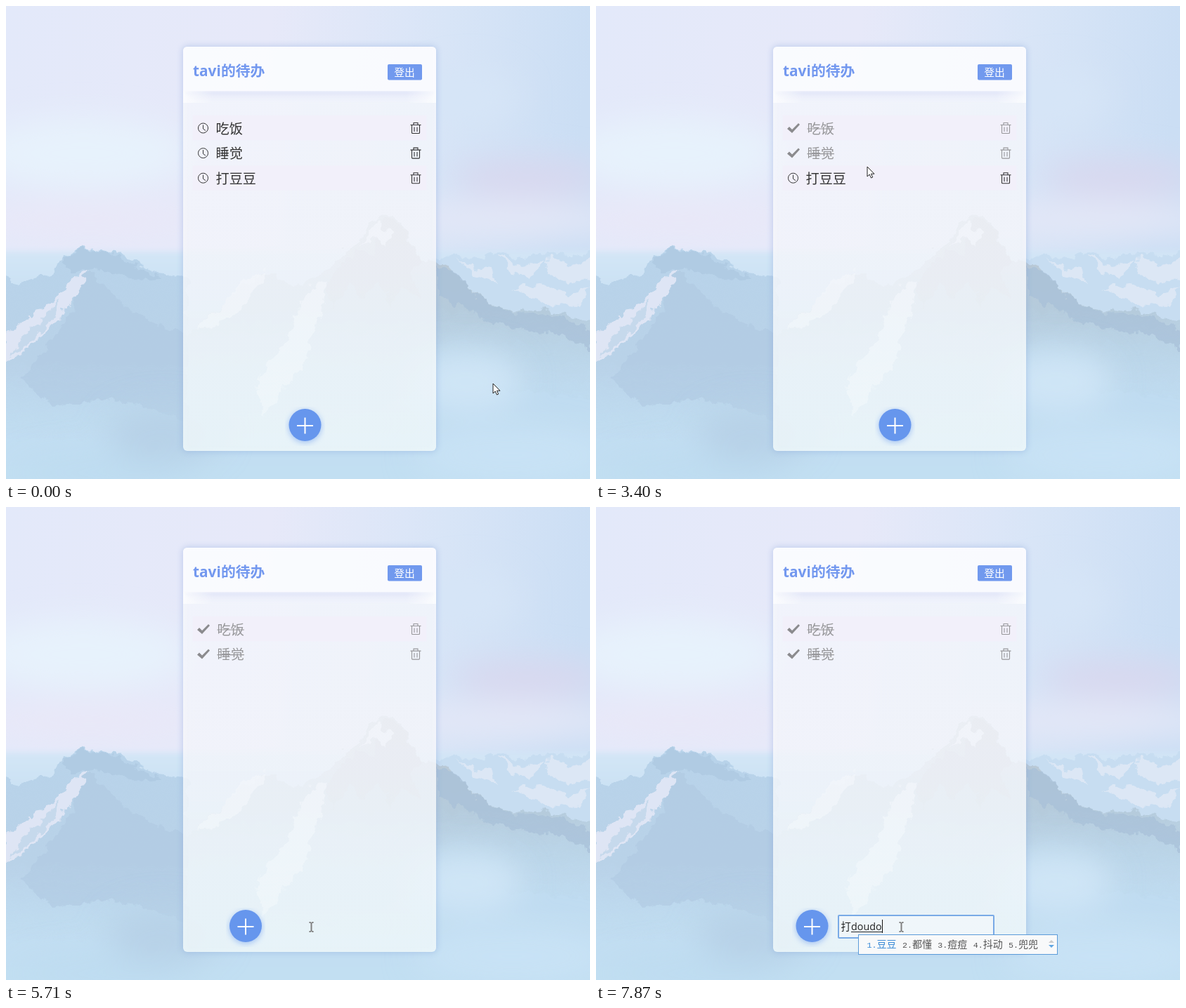
An HTML page that plays this animation: 831 px wide and 674 px high, repeating every 7.99 s.

```html
<!DOCTYPE html>
<html lang="zh">
<head>
<meta charset="utf-8">
<style>
html, body { margin: 0; width: 100%; height: 100%; overflow: hidden; }
svg { display: block; width: 831px; height: 674px; }
text { font-family: "Open Sans", "Noto Sans CJK SC", "Noto Sans CJK", sans-serif; white-space: pre; }
.icon { fill: none; stroke: currentColor; }
#popup text { font-size: 14px; fill: #555; }
#popup .num { font: 11.67px "Liberation Mono", monospace; }
#popup .first { fill: #3a8ad6; }
#beam { mix-blend-mode: difference; }
</style>
</head>
<body>
<svg viewBox="0 0 831 674">
  <defs>
    <linearGradient id="sky" x2="1" y2=".12">
      <stop stop-color="#e3e9fa"/><stop offset=".45" stop-color="#e7e9f9"/>
      <stop offset=".75" stop-color="#d8e5f7"/><stop offset="1" stop-color="#cbdef4"/>
    </linearGradient>
    <linearGradient id="land" x2="0" y2="1">
      <stop stop-color="#d3e6f6"/><stop offset=".35" stop-color="#bfdaf0"/><stop offset="1" stop-color="#c3e0f3"/>
    </linearGradient>
    <linearGradient id="west" x2="0" y2="1">
      <stop stop-color="#b8d3ea"/><stop offset=".6" stop-color="#b9d2e8"/><stop offset="1" stop-color="#bcd8ec" stop-opacity="0"/>
    </linearGradient>
    <linearGradient id="peak" x2="0" y2="1">
      <stop stop-color="#bfc8d0"/><stop offset=".45" stop-color="#b5cbdc"/><stop offset="1" stop-color="#bedcf0" stop-opacity="0"/>
    </linearGradient>
    <linearGradient id="veil" x2="0" y2="1">
      <stop stop-color="#fefeff"/><stop offset=".5" stop-color="#fefdfd"/><stop offset="1" stop-color="#f8fffc"/>
    </linearGradient>
    <linearGradient id="under" x2="0" y2="1">
      <stop stop-color="#d9def6"/><stop offset=".5" stop-color="#e9ecfa" stop-opacity=".8"/>
      <stop offset="1" stop-color="#eef0fb" stop-opacity=".4"/>
    </linearGradient>
    <linearGradient id="sides">
      <stop stop-color="#fff" stop-opacity=".7"/><stop offset=".12" stop-color="#fff" stop-opacity="0"/>
      <stop offset=".88" stop-color="#fff" stop-opacity="0"/><stop offset="1" stop-color="#fff" stop-opacity=".7"/>
    </linearGradient>
    <filter id="soft" x="-50%" y="-50%" width="200%" height="200%"><feGaussianBlur stdDeviation="22"/></filter>
    <filter id="glow" x="-10%" y="-10%" width="120%" height="120%"><feGaussianBlur stdDeviation="4"/></filter>
    <filter id="faint" x="-10%" y="-50%" width="120%" height="200%"><feGaussianBlur stdDeviation="1.5"/></filter>
    <filter id="rough" x="-5%" y="-5%" width="110%" height="110%">
      <feTurbulence type="fractalNoise" baseFrequency=".07" numOctaves="3" seed="4"/>
      <feDisplacementMap in="SourceGraphic" scale="17" xChannelSelector="R" yChannelSelector="G"/>
    </filter>
  </defs>

  <!-- landscape -->
  <rect width="831" height="674" fill="url(#sky)"/>
  <g filter="url(#soft)">
    <ellipse cx="110" cy="210" rx="150" ry="50" fill="#e7f2fc"/>
    <ellipse cx="120" cy="305" rx="170" ry="28" fill="#e9e8f8"/>
    <ellipse cx="745" cy="245" rx="110" ry="28" fill="#d8d8ef"/>
    <ellipse cx="700" cy="305" rx="180" ry="28" fill="#e3e7f7"/>
    <ellipse cx="660" cy="130" rx="70" ry="40" fill="#d6e5f7"/>
  </g>
  <path d="M-20 350H851V700H-20Z" fill="url(#land)" filter="url(#glow)"/>
  <g filter="url(#rough)">
    <path d="M605 362L640 354 668 362 700 350 735 360 770 350 800 357 850 347V470L605 440Z" fill="#c7ddf1"/>
    <path d="M640 358L668 375 690 372 700 395 672 390ZM700 354L735 372 770 360 745 390 722 380ZM772 354L800 372 850 352V385L800 395 770 380ZM720 405L760 395 800 415 831 400 815 428 770 425Z" fill="#e2eaf7" opacity=".8"/>
    <path d="M-10 365L8 395 65 382 80 358 108 344 145 348 180 363 215 382 258 386V620H-10Z" fill="url(#west)"/>
    <path d="M80 360L108 346 145 350 175 366 225 390 180 388 135 374 110 376 90 380Z" fill="#b0cbe3"/>
    <path d="M112 375L135 392 165 425 215 455 258 470V590L150 560 70 570 20 530 62 480 95 430Z" fill="#b1cbe3" opacity=".7"/>
    <path d="M116 374L96 388 70 418 35 440 0 470-10 520 20 495 52 470 80 440 98 415Z" fill="#e5e9f7" opacity=".85"/>
    <path d="M75 418L50 450 30 462 8 498 28 484 50 465 72 440Z" fill="#c6d9ec"/>
    <path d="M258 470L300 430 365 378 420 400 470 368 487 345 505 330 520 308 542 298 560 305 578 338 590 362 630 370 660 402 690 424 720 438 770 430 850 460V560L620 540 450 600 258 570Z" fill="url(#peak)"/>
    <path d="M540 302L562 310 580 345 590 365 575 380 590 415 560 400 548 430 530 390 505 420 490 395 465 430 455 400 475 370 500 350 520 352Z" fill="#b0bac2" opacity=".65"/>
    <path d="M614 372L640 378 662 405 692 426 720 440 775 438 831 460V490L790 470 740 462 690 450 650 430 614 410Z" fill="#a9c1d9" opacity=".75"/>
    <path d="M372 376L345 388 312 420 270 460 300 456 335 430 352 408ZM455 392L432 402 415 430 405 465 382 500 355 535 368 585 400 540 425 510 440 460 450 430ZM532 305L520 320 505 342 528 330 538 345 548 325Z" fill="#f3f8fd" opacity=".85"/>
  </g>
  <g filter="url(#soft)">
    <ellipse cx="655" cy="535" rx="80" ry="45" fill="#cfe5f6"/>
    <ellipse cx="140" cy="665" rx="130" ry="28" fill="#bedcf0"/>
    <ellipse cx="225" cy="610" rx="80" ry="40" fill="#b7d1e7"/>
    <ellipse cx="720" cy="640" rx="140" ry="40" fill="#c8e2f5"/>
  </g>

  <!-- card -->
  <rect x="251" y="57" width="362" height="578" rx="7" fill="#7f9fd8" opacity=".38" filter="url(#glow)"/>
  <rect x="252" y="58" width="360" height="576" rx="6" fill="url(#veil)" opacity=".78"/>
  <g filter="url(#faint)">
    <path d="M254 122H610Q606 136 582 136H282Q258 136 254 122Z" fill="url(#under)" opacity=".75"/>
  </g>
  <rect x="252" y="121" width="360" height="17" fill="url(#sides)"/>
  <path d="M252 121V64Q252 58 258 58H606Q612 58 612 64V121Z" fill="#fcfcff" opacity=".75"/>
  <text x="266" y="100" font-size="20.8" font-weight="700" fill="#7398ef">tavi<tspan x="306">的待办</tspan></text>
  <rect x="543" y="83" width="49" height="22.5" rx="2" fill="#7199ee"/>
  <text x="552.3" y="100" font-size="14.8" fill="#fff">登出</text>
  <g id="rows"></g>

  <!-- input bar -->
  <g id="field">
    <rect x="345" y="582" width="221" height="32" rx="1" fill="#fff" fill-opacity=".35" stroke="#79aae6" stroke-width="2"/>
    <text id="hint" x="348.5" y="603" font-size="13.9" fill="#757575">请输入您的待办，按回车键添加</text>
    <text id="typed" x="348.5" y="603" font-size="14.3" fill="#222"></text>
    <path id="line" stroke="#222"/>
    <path id="caret" stroke="#111"/>
  </g>
  <g id="add">
    <circle cy="2" r="23" fill="#6495ed" opacity=".55" filter="url(#glow)"/>
    <circle r="23" fill="#6696ed"/>
    <path d="M-11.5 1H11.5M0-10.5V12.5" stroke="#fff" stroke-width="2"/>
  </g>
  <g id="popup"></g>

  <!-- pointers -->
  <path id="arrow" d="M.5.5V14.5L3.7 11.5 6 16.5 8.2 15.5 6 10.7H10.5Z" fill="#fff" stroke="#222"/>
  <path id="hand" d="M-1.5 1Q0-1 1.5 1V7Q3 5.5 4.2 7.3 6 6 7 8 9 7 9.5 9.5V13Q9 15 7.5 17.5H-.5Q-2-1 -1.5 1M-.5 17.5Q-2 14-5 10.5-5-.0-5 9.5-3.5 8-1.5 10.5V1M1.5 7V9.5M4.2 7.3V10M7 8V10.5" fill="#fff" stroke="#111"/>
  <path id="beam" d="M-3-6.5H-1L0-5.5 1-6.5H3M0-5.5V5.5M-3 6.5H-1L0 5.5 1 6.5H3" fill="none" stroke="#fff"/>
</svg>
<script>
const LOOP = 7990;
const $ = id => document.getElementById(id);
const show = (el, on) => el.style.display = on ? '' : 'none';
const at = (el, x, y) => el.setAttribute('transform', `translate(${x} ${y})`);
// Latest entry of [time, ...values] that has begun
const held = (list, t) => list.filter(e => e[0] <= t).pop();

const pointer = [
  [0, 692, 537, 'arrow'], [530, 688, 534, 'arrow'], [670, 460, 330, 'arrow'], [800, 326, 226, 'beam'],
  [950, 287, 183, 'arrow'], [1100, 280, 169, 'arrow'], [1250, 281, 170, 'arrow'], [2060, 281, 172, 'arrow'],
  [2210, 280, 187, 'arrow'], [2330, 278, 207, 'arrow'], [3280, 300, 212, 'arrow'], [3400, 385, 228, 'arrow'],
  [3520, 490, 248, 'arrow'], [3640, 591, 260, 'arrow'], [3760, 585, 246, 'hand'], [4840, 572, 300, 'arrow'],
  [4960, 530, 400, 'arrow'], [5080, 475, 510, 'arrow'], [5200, 442, 575, 'arrow'], [5320, 434, 598, 'beam']
];
const binScale = [[0, 1], [3910, 1.12], [4030, 1.22], [4180, 1.25]];
const lastRow = [[0, 1], [4330, .6], [4450, .25], [4570, 0]];
const addX = [[0, 425.5], [5590, 394], [5710, 341], [5860, 315], [5980, 307.5]];
const fieldAlpha = [[0, 0], [5860, .35], [5980, .75], [6130, 1]];
// time, committed text, letters being composed, candidates
const typing = [
  [0, '', '', ''],
  [6660, '', 'd', '的 都 到 打 点'],
  [6780, '', 'da', '大 打 达 答 搭'],
  [7210, '打', '', ''],
  [7480, '打', 'd', '的 都 到 打 点'],
  [7600, '打', 'do', '都 动 东 懂 斗'],
  [7750, '打', 'doud', '都懂 豆豆 抖动 斗地主 兜兜'],
  [7870, '打', 'doudo', '豆豆 都懂 痘痘 抖动 兜兜']
];

const bin = `<path class="icon bin" d="M-7.5-4.5H7.5M-3-4.5V-7.5H3V-4.5M-5.5-4.5V6.5Q-5.5 7.5-4.5 7.5H4.5Q5.5 7.5 5.5 6.5V-4.5M-2-1.5V5M2-1.5V5" stroke-width="1.1"/>`;
const rows = [['吃饭', 1780], ['睡觉', 2730], ['打豆豆', Infinity]].map(([name, doneAt], i) => {
  const g = document.createElementNS('http://www.w3.org/2000/svg', 'g');
  at(g, 0, 174 + i * 35.6);
  const side = (cls, color, mark, x, extra) => `<g class="${cls}" color="${color}">${mark}
    <text x="${x}" y="7.6" font-size="19.2" fill="currentColor">${name}</text>${extra}
    <g transform="translate(583 0)">${bin}</g></g>`;
  const stripe = i % 2 ? '' : '<rect x="265.5" y="-18" width="333" height="35.5" fill="#f2f0fb" opacity=".85"/>';
  const clock = '<path class="icon" d="M287.5 0A7 7 0 1 1 273.5 0A7 7 0 1 1 287.5 0M280.5-4.5V1L284 3.5" stroke="#666"/>';
  const check = '<path d="M272 1L275-2 279 2 288-7 290-5 279 7Z" fill="#8b8b8e"/>';
  g.innerHTML = stripe + side('todo', '#333', clock, 298.5, '') +
    side('done', '#97979a', check, 300.5, `<path class="icon" d="M300.5 1h${name.length * 19.2}" stroke-width="1.2"/>`);
  $('rows').append(g);
  return { g, doneAt, todo: g.querySelector('.todo'), done: g.querySelector('.done') };
});

function candidates(list, left) {
  if (!list) return '';
  let x = left + 12.5, out = '';
  list.split(' ').forEach((word, i) => {
    const cls = i ? '' : 'first';
    out += `<text class="num ${cls}" x="${x}" y="628">${i + 1}.</text><text class="${cls}" x="${x + 14}" y="628">${word}</text>`;
    x += 22.4 + word.length * 14;
    if (!i && word.length === 1) {
      out += `<rect x="${x - 7}" y="617" width="5" height="5" fill="#d8ecfb" stroke="#3a8ad6" stroke-width="1.5"/>`;
      x += 8.5;
    }
  });
  const right = Math.round(x + 19.5);
  return `<rect x="${left + .5}" y="609.5" width="${right - left - 1}" height="28" fill="#f8f9fa" stroke="#5b9bd9"/>${out}
    <path d="M${right - 13} 621h8l-4-4Z" fill="#ccc"/><path d="M${right - 13} 624h8l-4 4Z" fill="#5fa5e2"/>`;
}

let shown;
function type(state) {
  if (state === shown) return;
  shown = state;
  const [, text, letters, list] = state;
  const start = 349 + text.length * 14;
  $('typed').innerHTML = `${text}<tspan x="${start}">${letters}</tspan>`;
  show($('hint'), !text && !letters);
  const end = start + Math.round(letters.length * 8.75);
  $('line').setAttribute('d', letters ? `M${start} 605.5H${end}` : '');
  $('caret').setAttribute('d', `M${end + .5} 588V607`);
  $('popup').innerHTML = candidates(list, start + 10);
}

function frame(now) {
  const t = now % LOOP;
  rows.forEach(r => {
    show(r.todo, t < r.doneAt);
    show(r.done, t >= r.doneAt);
  });
  rows[2].g.style.opacity = held(lastRow, t)[1];
  rows[2].todo.querySelector('.bin').setAttribute('transform', `scale(${held(binScale, t)[1]})`);
  at($('add'), held(addX, t)[1], 597);
  $('field').style.opacity = held(fieldAlpha, t)[1];
  type(held(typing, t));
  const [, x, y, kind] = held(pointer, t);
  ['arrow', 'hand', 'beam'].forEach(id => show($(id), id === kind));
  at($(kind), x + .5, y + .5);
  requestAnimationFrame(frame);
}
requestAnimationFrame(frame);
</script>
</body>
</html>
```
